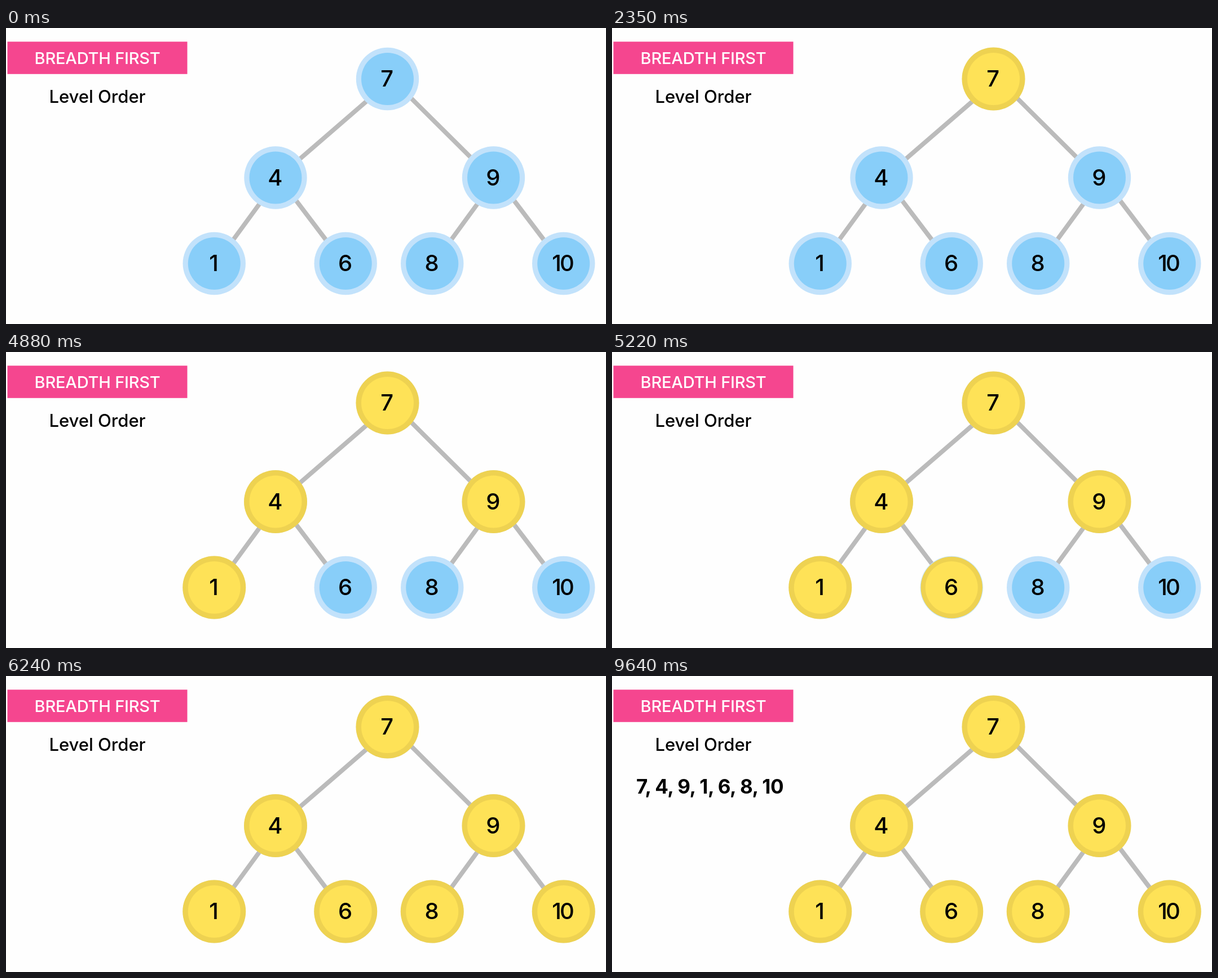
Animation, 1064 px wide and 526 px high, one loop 9710 ms. Source, as an HTML page:

```html
<!DOCTYPE html>
<html lang="en">
<head>
<meta charset="utf-8">
<title>Level order traversal</title>
<style>
  html, body { margin: 0; width: 100%; height: 100%; overflow: hidden; background: #fefefe; }
  svg { display: block; width: 1064px; height: 526px; }
  text { font-family: Inter, "Open Sans", sans-serif; font-weight: 500; text-anchor: middle; }
  .value { font-size: 40px; letter-spacing: -3px; }
  #order { font-size: 35px; font-weight: 700; letter-spacing: -0.5px; }
</style>
</head>
<body>
<svg viewBox="0 0 1064 526">
  <rect x="2.5" y="24.3" width="319" height="57.5" fill="#f5468f"/>
  <text x="162" y="64" font-size="29" letter-spacing="-0.2" fill="#fff">BREADTH FIRST</text>
  <text x="162" y="133" font-size="31">Level Order</text>
  <text id="order" x="173.5" y="209"></text>
  <g id="edges" stroke="#bbb" stroke-width="8"></g>
  <g id="nodes"></g>
</svg>
<script>
const LOOP = 9710, CORE = 46.5, RADIUS = 56;
const values = [7, 4, 9, 1, 6, 8, 10];

// left/right: child offset from its parent; start/span: when the level is visited; wipe: time per node
const levels = [
  { y: 90.5, start: 1090, span: 0, wipe: 340 },
  { y: 266, left: -198.5, right: 188, start: 2380, span: 940, wipe: 340 },
  { y: 418.5, left: -108.75, right: 124.25, start: 4390, span: 1050, wipe: 230 }
];

const byId = id => document.getElementById(id);

function add(parent, tag, attrs) {
  const el = document.createElementNS("http://www.w3.org/2000/svg", tag);
  for (const key in attrs) el.setAttribute(key, attrs[key]);
  return parent.appendChild(el);
}

function addEdge(parent, child, side) {
  add(byId("edges"), "line", {
    x1: parent.x, y1: parent.y - side * 7.5, x2: child.x, y2: child.y + 4
  });
}

function addNode(node, value) {
  const disc = (r, fill) => add(byId("nodes"), "circle", { cx: node.x, cy: node.y, r, fill });
  disc(55.7, "#c2e2fb");
  disc(CORE, "#88cef9");
  node.ring = disc(0, "#eed251");
  node.core = disc(0, "#fee257");
  add(byId("nodes"), "text", { x: node.x - 2.2, y: node.y + 13.7, class: "value" }).textContent = value;
}

// The tree is stored in heap order: the parent of i is (i - 1) >> 1.
const nodes = [];
values.forEach((value, i) => {
  const depth = Math.floor(Math.log2(i + 1));
  const { y, left, right, start, span, wipe } = levels[depth];
  const last = 2 ** depth - 1;
  const place = last ? (i - last) / last : 0;
  const parent = nodes[(i - 1) >> 1];
  const side = i % 2 ? -1 : 1;
  const x = parent ? parent.x + (side < 0 ? left : right) : 676.5;
  const node = { x, y, wipe, start: start + span * Math.sqrt(place) };
  if (parent) addEdge(parent, node, side);
  addNode(node, value);
  nodes.push(node);
});
byId("order").textContent = values.join(", ");

const progress = (t, start, duration) => Math.max(0, Math.min(1, (t - start) / duration));

function draw() {
  const t = (performance.now() - begin) % LOOP;
  for (const { ring, core, start, wipe } of nodes) {
    const r = RADIUS * progress(t, start, wipe);
    ring.setAttribute("r", r);
    core.setAttribute("r", Math.min(r, CORE));
  }
  byId("order").setAttribute("opacity", progress(t, 6370, 380));
  requestAnimationFrame(draw);
}

const begin = performance.now();
draw();
</script>
</body>
</html>
```
